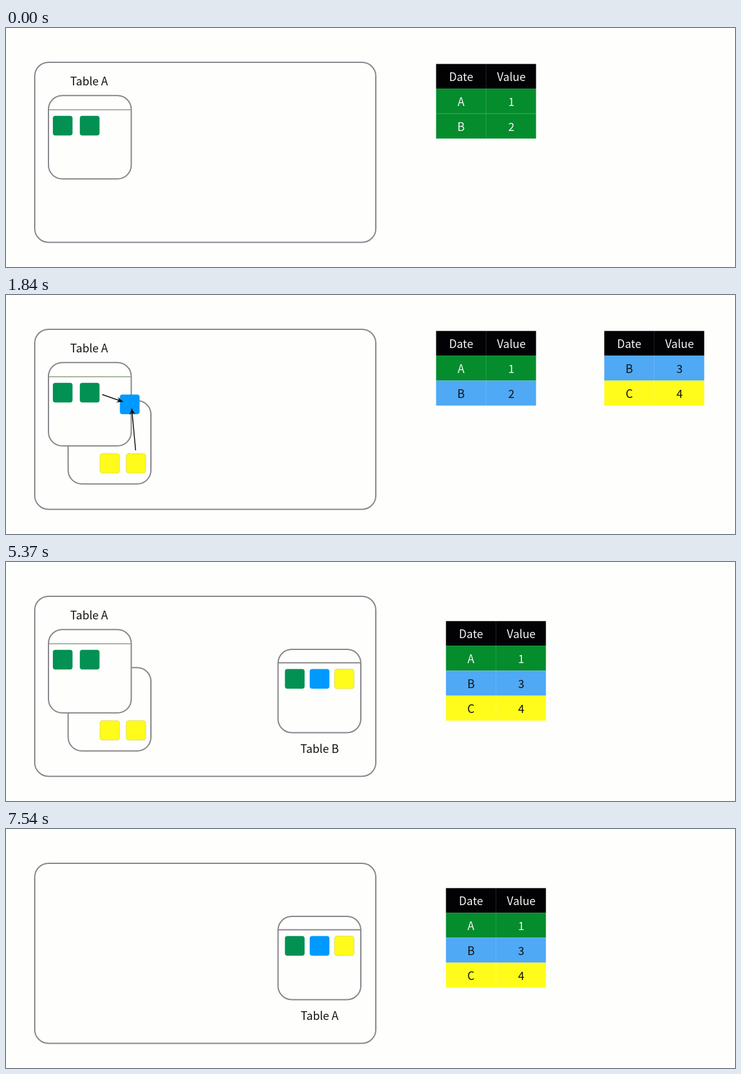
Recreate the animation shown at these times as an HTML page. Size 1167 by 383 pixels, loop 8 s.

```html
<!DOCTYPE html>
<html lang="en">
<head>
<meta charset="utf-8">
<title>Table merge</title>
<style>
  html, body { margin: 0; width: 100%; height: 100%; overflow: hidden; background: #fefefd; }
  svg { display: block; width: 100vw; height: 100vh; }
  text {
    font: 18px "Noto Sans CJK JP", "Noto Sans CJK SC", "Noto Sans CJK", "Noto Sans", sans-serif;
    text-anchor: middle;
  }
  .box { fill: #fefefd; stroke: #86868b; stroke-width: 2; }
  .arrow { stroke: #111; stroke-width: 1.5; }
</style>
</head>
<body>
<svg viewBox="0 0 1167 383">
  <defs>
    <marker id="head" markerUnits="userSpaceOnUse" markerWidth="12" markerHeight="12" refX="10" refY="5" orient="auto">
      <path d="M10 5L0 .3Q3 3 3 5Q3 7 0 9.7Z" fill="#111"/>
    </marker>
  </defs>
  <rect class="box" x="46" y="55" width="546" height="288.5" rx="22"/>
  <g id="scene"></g>
</svg>
<script>
const LOOP = 8000;
const SQUARE = { green: '#029153', blue: '#0099ff', yellow: '#fffb1a' };
const ROW = { black: '#020204', green: '#058c2d', blue: '#4fa9f5', yellow: '#fffc1c' };

const label = (x, y, text, fill = '#111') =>
  `<text x="${x}" y="${y + 6.6}" fill="${fill}">${text}</text>`;

const line = (x1, y1, x2, y2, attrs) =>
  `<line x1="${x1}" y1="${y1}" x2="${x2}" y2="${y2}" ${attrs}/>`;

const arrow = (...ends) => line(...ends, 'class="arrow" marker-end="url(#head)"');

const box = (x, y) => `<rect class="box" x="${x}" y="${y}" width="132.5" height="133.5" rx="22"/>`;

function square(x, y, color) {
  const edge = color === 'yellow' ? 'stroke="#a5a56a" stroke-width=".8" stroke-dasharray="1 1.5"' : '';
  return `<rect x="${x}" y="${y}" width="31.5" height="31.5" rx="4" fill="${SQUARE[color]}" ${edge}/>`;
}

// rows: [color, date, value]
function table(x, y, rows, headHeight = 39.5) {
  let top = y;
  return [['black', 'Date', 'Value'], ...rows].map(([color, date, value], i) => {
    const height = i ? 40 : headHeight;
    const ink = color === 'black' || color === 'green' ? '#f6f6f6' : '#111';
    const row = `<rect x="${x}" y="${top}" width="160" height="${height + .1}" fill="${ROW[color]}"/>`
      + line(x + 80, top, x + 80, top + height, 'stroke="#fff" stroke-opacity=".14"')
      + (i > 1 ? line(x, top, x + 160, top, 'stroke="#fff" stroke-opacity=".18"') : '')
      + label(x + 40, top + height / 2 + .8, date, ink)
      + label(x + 120.5, top + height / 2 + .8, value, ink);
    top += height;
    return row;
  }).join('');
}

const frontBox = box(68, 108.3) + line(69, 131, 199.5, 131, 'stroke="#8d9c86" stroke-width="1.6"')
  + label(133, 85.2, 'Table A');
const backBox = box(99.5, 169.3);
const green1 = square(75, 140.7, 'green');
const green2 = square(118.2, 140.7, 'green');
const yellow1 = square(150.4, 254, 'yellow');
const yellow2 = square(192.3, 254, 'yellow');
const shared = square(182.3, 159.4, 'blue');
const pair = backBox + frontBox + green1 + green2 + yellow1 + yellow2;

const split = square(303.3, 68.7, 'green') + square(303.3, 159.4, 'blue') + square(303.3, 254, 'yellow');

const result = name => box(435.5, 140)
  + line(436, 161.5, 568, 161.5, 'stroke="#86868b" stroke-width="1.8"')
  + square(446.5, 171.5, 'green') + square(486.2, 171.5, 'blue') + square(525.8, 171.5, 'yellow')
  + label(502, 299, name)
  + table(704.3, 94.7, [['green', 'A', 1], ['blue', 'B', 3], ['yellow', 'C', 4]]);

const oldRows = color => table(688.5, 57.6, [['green', 'A', 1], [color, 'B', 2]]);
const newRows = color => table(957.7, 57.6, [[color, 'B', 3], ['yellow', 'C', 4]]);

const scenes = [
  [0, frontBox + green1 + green2 + oldRows('green')],
  [500, pair + oldRows('green') + newRows('yellow')],
  [1840, pair + shared + arrow(154, 159.5, 187, 171) + arrow(207.5, 249, 201.3, 182)
    + oldRows('blue') + newRows('blue')],
  [2940, backBox + frontBox + green1 + yellow1 + shared + split
    + arrow(113.5, 156, 297, 84) + arrow(217, 176.3, 302, 176.3) + arrow(190, 269.3, 296, 269.3)
    + table(688.5, 57.6, [['green', 'A', 1]], 40.3)
    + table(957.7, 57.6, [['blue', 'B', 3]], 40)
    + table(688.5, 219.3, [['yellow', 'C', 4]], 40)],
  [4140, pair + split + result('Table B')
    + arrow(342.5, 84, 428, 151) + arrow(348, 175, 434, 175) + arrow(342.5, 269.5, 428, 202)],
  [5370, pair + result('Table B')],
  [6370, result('Table B')],
  [7540, result('Table A')]
];

const stage = document.getElementById('scene');
const start = performance.now();
let shown;

function render(time) {
  const [, markup] = scenes.findLast(([from]) => from <= time);
  if (markup !== shown) stage.innerHTML = shown = markup;
}

function tick() {
  render((performance.now() - start) % LOOP);
  requestAnimationFrame(tick);
}
tick();
</script>
</body>
</html>
```
